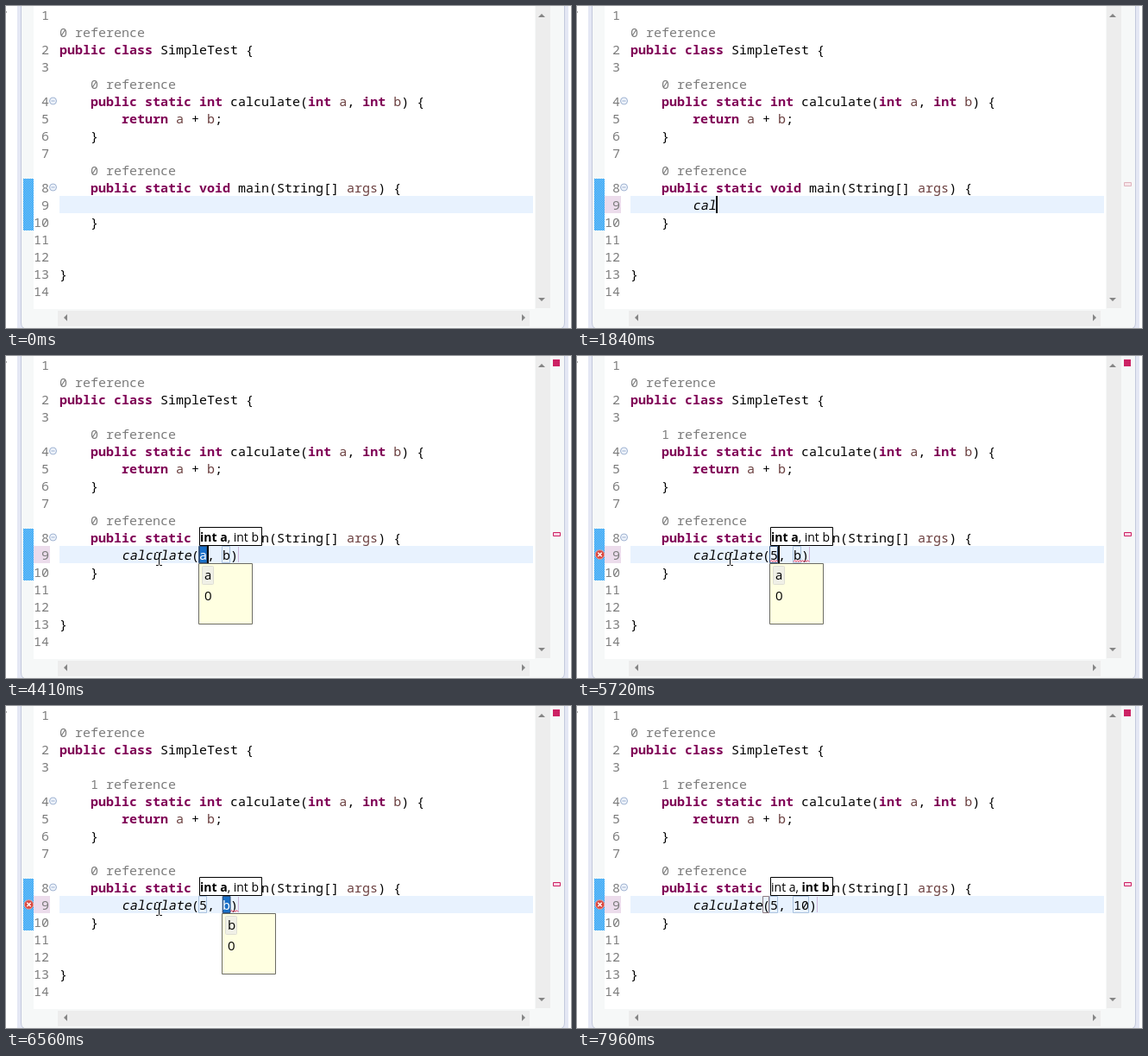
Write an HTML page that moves like this. It is 655 px wide and 373 px high and loops after 8000 ms.

```html
<!DOCTYPE html>
<html lang="en">
<head>
<meta charset="utf-8">
<title>Java editor</title>
<style>
  html, body { margin: 0; width: 100%; height: 100%; overflow: hidden; background: #fff; }
  svg { display: block; }
  text { white-space: pre; }
  .code { font: 15px "Noto Sans Mono", monospace; }
  .ui { font: 14px "Open Sans", sans-serif; fill: #000; }
  .ui.item { font-size: 15px; }
  .b, .kw { font-weight: 700; }
  .kw { fill: #7f0055; }
  .param { fill: #6a3e3e; }
  .lens, .num { fill: #7c7c7c; }
  .num { text-anchor: end; }
  .line { fill: none; stroke-width: 1; }
  .wave { fill: none; stroke: #f0506a; }
</style>
</head>
<body>
<svg width="655" height="373" viewBox="0 0 655 373">
  <defs>
    <pattern id="check" width="2" height="2" patternUnits="userSpaceOnUse">
      <path fill="#8fd0fb" d="M0 0h2v2H0z"/>
      <path fill="#1a98f2" d="M0 0h1v1H0zM1 1h1v1H1z"/>
    </pattern>
    <path id="wave" class="wave" d="M0 238.5l1.5-2 1.5 2 1.5-2 1.5 2 1.5-2 1.5 2"/>
  </defs>

  <!-- window frame -->
  <path fill="#fff" d="M0 0h655v373H0z"/>
  <path fill="#aaa" d="M0 6h1v2H0z"/>
  <path fill="#e4e7f4" d="M13 0h639v373H13z"/>
  <path fill="#f6f8f8" stroke="#c3c9dc" d="M17.5-1V367q0 7 7 7H640.500q7 0 7-7V-1z"/>
  <path fill="#fff" d="M32 0h581v351H32z"/>
  <path fill="#ededed" d="M614 0h17v350h-17zM60 353h547v18H60z"/>
  <path fill="#858585" d="M617 13l4-4 4 4zM617 338h8l-4 4zM71 357v8l-4-4zM598 357v8l4-4z"/>

  <!-- gutter and current line -->
  <path fill="url(#check)" d="M20 200h12v60H20z"/>
  <path fill="#e8f2fe" d="M62 220h549v20H62z"/>
  <path id="changed" fill="#ecdcec" d="M32 220h19v20H32z"/>
  <g id="folds" fill="#eef3fb" stroke="#9db1d0">
    <path d="M50.500 110a4 4 0 1 1 8 0 4 4 0 1 1-8 0M52.500 110h4"/>
    <path d="M50.500 210a4 4 0 1 1 8 0 4 4 0 1 1-8 0M52.500 210h4"/>
  </g>
  <g id="rows" class="code"></g>
  <g id="icon">
    <circle cx="26.500" cy="230" r="5.200" fill="#d9473f" stroke="#e9a39c"/>
    <path d="M24.300 227.800l4.400 4.400m0-4.400l-4.400 4.400" stroke="#fff" stroke-width="1.500"/>
  </g>

  <!-- overview ruler -->
  <path id="mark" d="M634.500 204.500h8v4h-8z"/>
  <path id="square" fill="#cc2264" d="M634 4h8v8h-8z"/>

  <!-- typed call -->
  <g class="code">
    <text id="name" transform="translate(134 236) skewX(-10)"></text>
    <text id="args" x="215" y="236"></text>
  </g>
  <path id="box1" class="line" d="M223.500 220.500h9v19h-9z"/>
  <path id="box2" class="line" stroke="#abc3df"/>
  <path id="exit" class="line" stroke="#cdb6da" d="M.5 221v18"/>
  <path id="bracket" class="line" stroke="#8d7a80" d="M215.500 220.500h7v19h-7z"/>
  <use id="wave1" href="#wave" x="224"/>
  <use id="wave2" href="#wave" x="251"/>
  <use id="wave3" href="#wave"/>
  <g id="sel">
    <path fill="#1a70c8" stroke="#2d4f7c" d="M.5 220.500h8.500v19H.5z"/>
    <text id="selText" class="code" y="236" fill="#fff"></text>
  </g>
  <path id="caret" fill="#000" d="M0 220h2v20H0z"/>

  <!-- popups -->
  <g id="hint">
    <path fill="#fff" stroke="#000" d="M224.500 198.500h72v21h-72z"/>
    <text class="ui" x="225" y="215"><tspan id="hintA">int a</tspan>, <tspan id="hintB">int b</tspan></text>
  </g>
  <g id="popup">
    <path fill="#ffffe1" stroke="#6c6c64" d="M.5 240.500h62v70H.5z"/>
    <rect x="4.500" y="243.500" width="13" height="21" rx="1" fill="#f0f0e6" stroke="#deded4"/>
    <text id="choice" class="ui item" x="7" y="259"></text>
    <text class="ui item" x="7" y="283">0</text>
  </g>
  <path id="mouse" class="line" stroke="#111" d="M-3.500-7.500h2.500l1 1 1-1h2.500M0-6.500v13M-3.500 7.500h2.500l1-1 1 1h2.500"/>
</svg>
<script>
const LOOP = 8000;
const el = {};
document.querySelectorAll('[id]').forEach(e => el[e.id] = e);

// [line number, code]; a row without a number is a code lens
const rows = [
  [1, ''],
  [0, '0 reference'],
  [2, 'public class SimpleTest {'],
  [3, ''],
  [0, '    0 reference'],
  [4, '    public static int calculate(int a, int b) {'],
  [5, '        return a + b;'],
  [6, '    }'],
  [7, ''],
  [0, '    0 reference'],
  [8, '    public static void main(String[] args) {'],
  [9, ''],
  [10, '    }'],
  [11, ''],
  [12, ''],
  [13, '}'],
  [14, '']
];
const paint = code => code
  .replace(/\b(args|a|b)\b/g, '<tspan class="param">$1</tspan>')
  .replace(/\b(public|class(?!=)|static|int|void|return)\b/g, '<tspan class="kw">$1</tspan>');

el.rows.innerHTML = rows.map(([num, code], i) => {
  const y = 16 + 20 * i;
  if (!num) return `<text class="lens" x="62" y="${y}">${code}</text>`;
  return `<text class="num" x="50" y="${y}">${num}</text><text x="62" y="${y}">${paint(code)}</text>`;
}).join('');
const lens = el.rows.querySelectorAll('.lens')[1];

const typed = [[0, 0], [1530, 1], [1760, 2], [1840, 3], [2140, 4], [2310, 5], [2770, 6], [2840, 7], [3860, 9]];
const args = [[0, ''], [3860, '(a, b)'], [5720, '(5, b)'], [7030, '(5, 1)'], [7500, '(5, 10)']];
// caret position; 0 is the dark half of a blink
const caret = [[0, 0], [830, 134], [1310, 0], ...typed.slice(1, 8).map(([t, n]) => [t, 134 + 9 * n]),
  [3860, 233], [4870, 0], [5400, 233], [5950, 0], [6100, 260], [6560, 0], [7030, 260], [7500, 269], [7890, 0]];

const at = (steps, t) => steps.filter(s => s[0] <= t).pop()[1];
const within = (t, a, b = LOOP) => t >= a && t < b;
const show = (e, on) => e.setAttribute('visibility', on ? 'visible' : 'hidden');
const move = (e, x, y = 0) => e.setAttribute('transform', `translate(${x} ${y})`);
const write = (e, s) => { if (e.textContent !== s) e.textContent = s; };

function pointer(t) {
  if (t < 210) return [226, 284];
  const step = t < 380 ? 0 : Math.min(7, Math.floor((t - 380) / 75) + 1);
  const p = Math.sin(step / 7 * Math.PI / 2);
  return [Math.round(209 - 32 * p) + .5, Math.round(274 - 39 * p)];
}

function draw(t) {
  write(el.name, 'calculate'.slice(0, at(typed, t)));
  write(el.args, at(args, t));
  write(lens, `    ${t < 4870 ? 0 : 1} reference`);

  const x = at(caret, t);
  show(el.caret, x);
  move(el.caret, x);

  show(el.changed, t >= 1530);
  show(el.mark, t >= 1530);
  el.mark.setAttribute('fill', t < 4410 ? '#f7e6ea' : '#fbd3e4');
  el.mark.setAttribute('stroke', t < 4410 ? '#dfb4be' : '#cc2264');
  show(el.square, t >= 4410);
  show(el.icon, t >= 4650);

  const linked = t >= 3860, late = t >= 7500;
  show(el.box1, linked);
  el.box1.setAttribute('stroke', t < 6100 ? '#3d5c86' : '#abc3df');
  show(el.box2, linked);
  el.box2.setAttribute('d', `M250.500 220.500h${late ? 18 : 9}v19h${late ? -18 : -9}z`);
  show(el.exit, linked);
  move(el.exit, late ? 278 : 269);
  show(el.bracket, t >= 7890);

  show(el.wave1, within(t, 4650, 6420));
  show(el.wave2, within(t, 4650, 7030));
  show(el.wave3, within(t, 4650, 7890));
  move(el.wave3, late ? 269 : 260);

  const second = t >= 6100;
  show(el.sel, within(t, 3860, 5720) || within(t, 6100, 7030));
  move(el.sel, second ? 251 : 224);
  write(el.selText, second ? 'b' : 'a');

  show(el.popup, within(t, 3960, 5800) || within(t, 6100, 7120));
  move(el.popup, second ? 250 : 223);
  write(el.choice, second ? 'b' : 'a');

  show(el.hint, t >= 3960);
  el.hintA.classList.toggle('b', t < 7210);
  el.hintB.classList.toggle('b', t >= 7210);

  show(el.mouse, within(t, 130, 1760) || within(t, 3150, 7120));
  move(el.mouse, ...pointer(t));
}

const start = performance.now();
function tick() {
  draw((performance.now() - start) % LOOP);
  requestAnimationFrame(tick);
}
tick();
</script>
</body>
</html>
```
